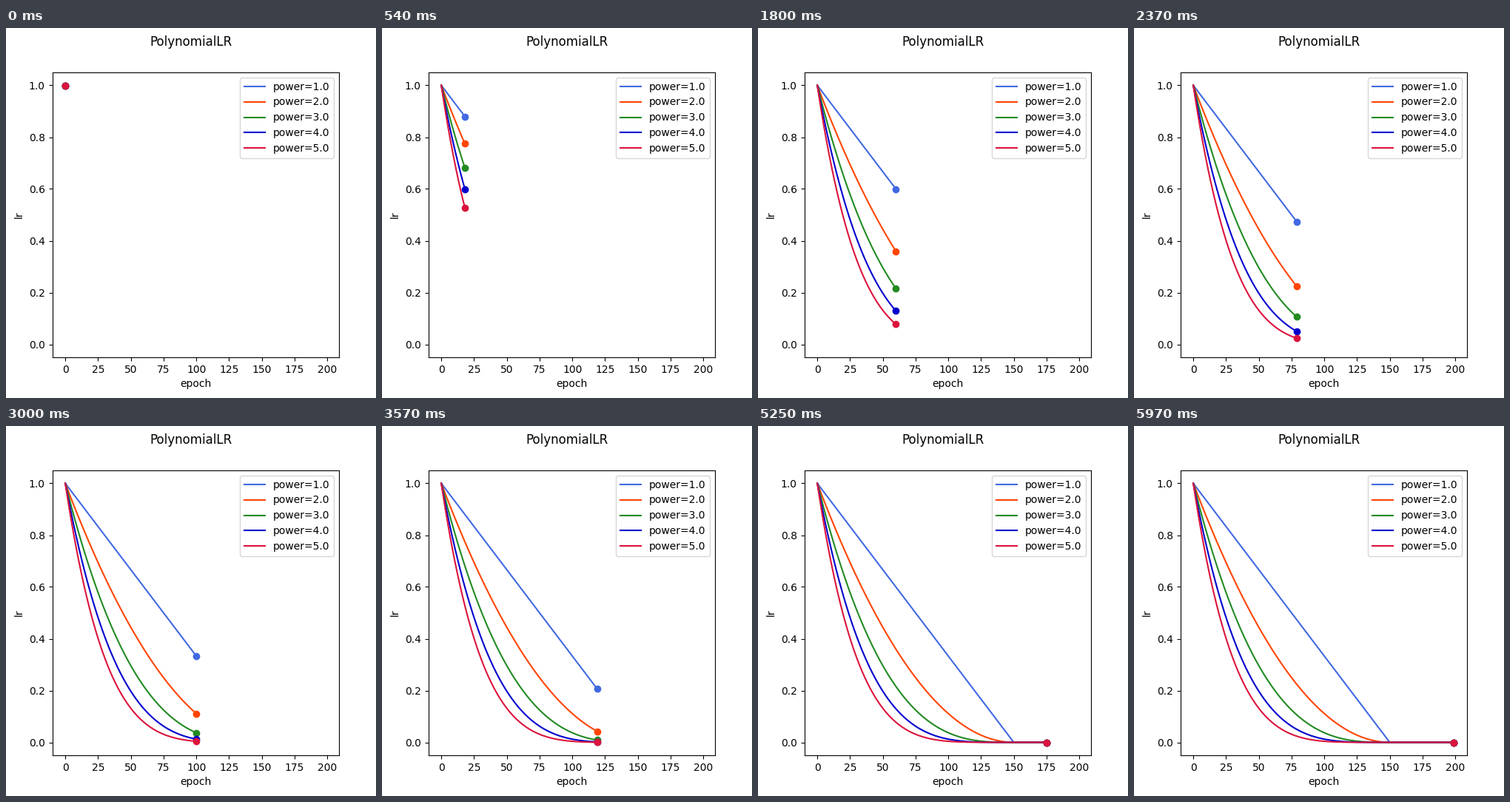
These frames come from a looping animation (500x500 px, 6000 ms). A matplotlib script:

```python
import matplotlib.pyplot as plt
import numpy as np
from matplotlib.animation import FuncAnimation

EPOCHS = 200
DECAY_EPOCHS = 150
COLORS = {
    1.0: "royalblue",
    2.0: "orangered",
    3.0: "forestgreen",
    4.0: "mediumblue",
    5.0: "crimson",
}

epochs = np.arange(EPOCHS)
remaining = 1 - np.minimum(epochs, DECAY_EPOCHS) / DECAY_EPOCHS

fig, ax = plt.subplots(figsize=(5, 5), dpi=100)
fig.suptitle("PolynomialLR")
ax.set_xlabel("epoch")
ax.set_ylabel("lr")

margin = 0.05
ax.set_xlim(-margin * (EPOCHS - 1), (1 + margin) * (EPOCHS - 1))
ax.set_ylim(-margin, 1 + margin)

curves = []
for power, color in COLORS.items():
    (line,) = ax.plot([], [], color=color, label=f"power={power}")
    (dot,) = ax.plot([], [], "o", color=color)
    curves.append((line, dot, remaining**power))
ax.legend(loc="upper right")


def update(epoch):
    artists = []
    for line, dot, lr in curves:
        line.set_data(epochs[: epoch + 1], lr[: epoch + 1])
        dot.set_data([epoch], [lr[epoch]])
        artists += [line, dot]
    return artists


anim = FuncAnimation(
    fig,
    update,
    frames=EPOCHS,
    init_func=lambda: update(0),
    interval=30,
    repeat=True,
    repeat_delay=0,
)
plt.show()
```
